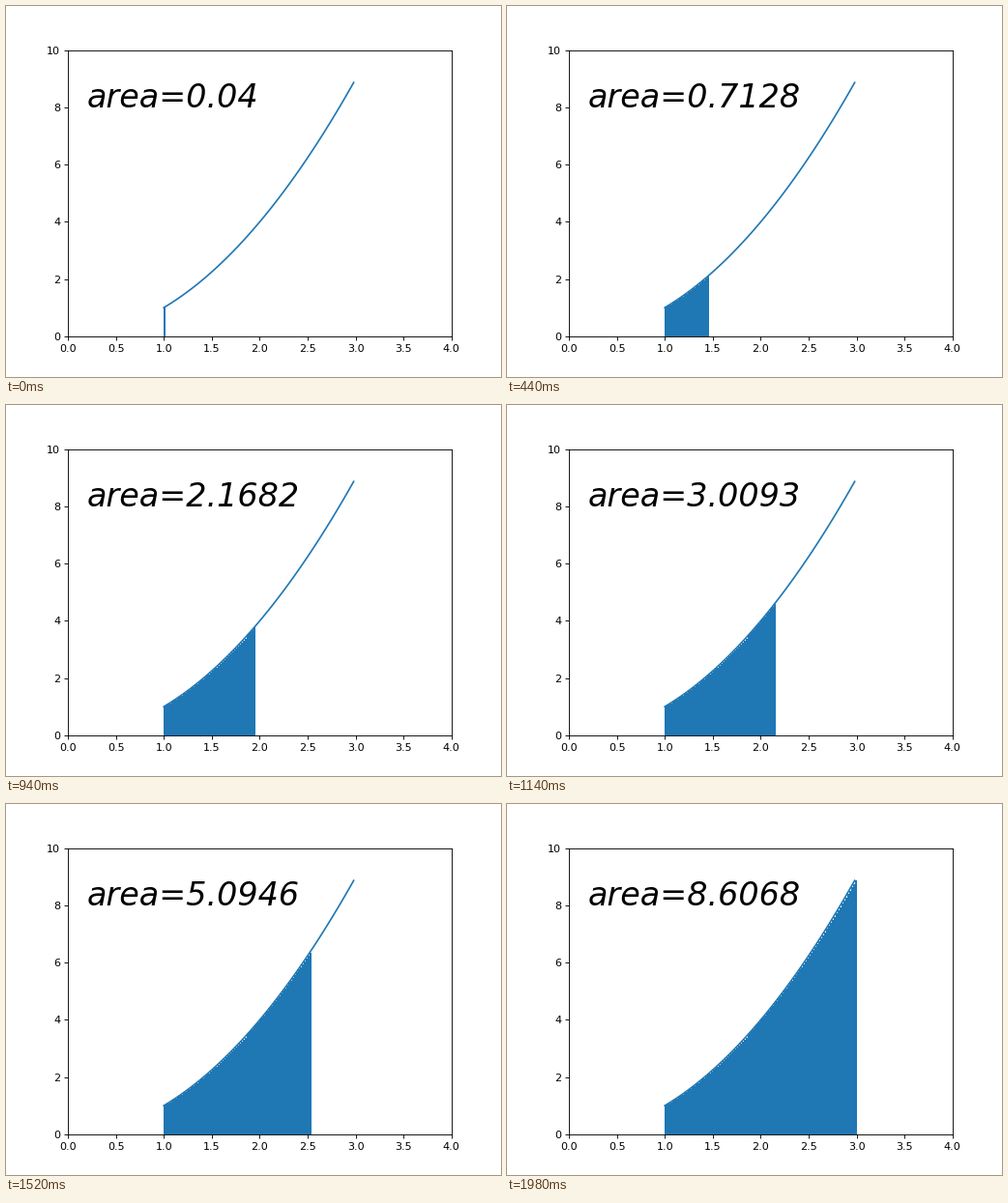
A matplotlib script for the animation above (2000 ms loop, 512 by 384 pixels).

```python
import matplotlib.pyplot as plt
import numpy as np
from matplotlib.animation import FuncAnimation

STEP = 0.02
FRAMES = 100
INTERVAL = 20  # ms

x = 1 + STEP * np.arange(FRAMES)
y = x ** 2
# The first strip is counted twice in the running total.
areas = STEP * y[0] + np.cumsum(y * STEP)

fig, ax = plt.subplots(figsize=(6.4, 4.8), dpi=80)
ax.set_xlim(0, 4)
ax.set_ylim(0, 10)
ax.plot(x, y, color="C0")
bars = ax.bar(x, y, width=STEP, align="edge", color="C0")
label = ax.text(0.2, 8, "", fontsize=30, style="italic")


def update(i):
    for k, bar in enumerate(bars):
        bar.set_visible(k <= i)
    label.set_text(f"area={round(float(areas[i]), 4)}")
    return [label, *bars]


anim = FuncAnimation(fig, update, frames=FRAMES, interval=INTERVAL,
                     repeat=True, repeat_delay=0)
plt.show()
```
